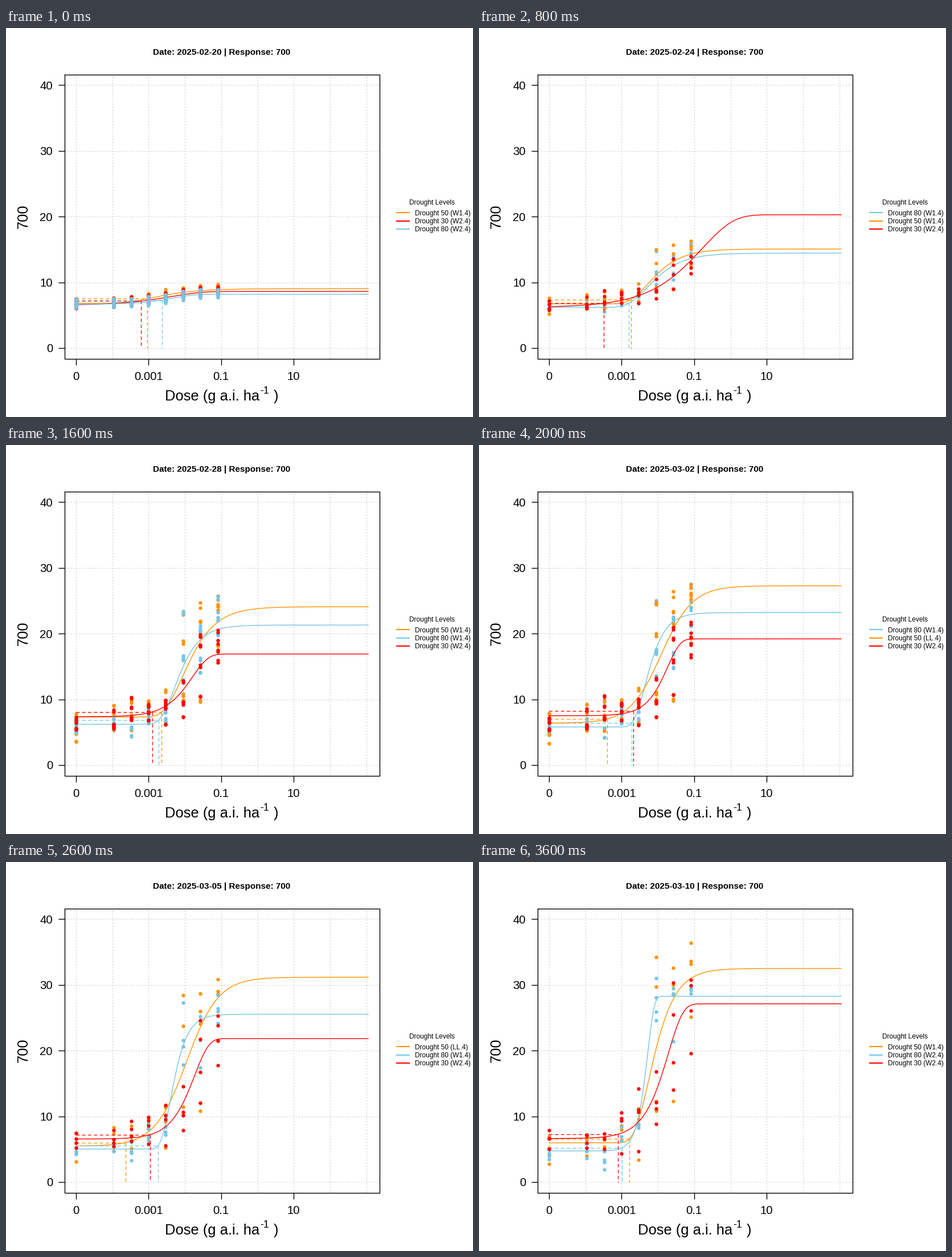
Animation, 820 px wide and 683 px high, one loop 3800 ms. Source, as a matplotlib script:

```python
import random

import numpy as np
import matplotlib.pyplot as plt
from matplotlib.animation import FuncAnimation

W, H, DPI = 820, 683, 64
PX = 72 / DPI  # points per pixel
DAYS = 19
X0, DECADE = 123, 63.7
Y0, UNIT = 562, 11.54
FONT = "Liberation Sans"

COLORS = {"50": "#FF9300", "30": "#FF0000", "80": "#75C5E8"}

# Dose-response links and their inverses (increasing curves)
LINKS = {
    "W1": (lambda p: -np.log(-np.log(p)), lambda z: np.exp(-np.exp(-z))),
    "W2": (lambda p: np.log(-np.log(1 - p)), lambda z: 1 - np.exp(-np.exp(z))),
    "LL": (lambda p: np.log(p / (1 - p)), lambda z: 1 / (1 + np.exp(-z))),
}

# First day of each set of models, in drawing order
MODELS = [
    (0, "50 W1, 30 W2, 80 W2"),
    (1, "50 LL, 30 W2, 80 W2"),
    (2, "50 W1, 80 W2, 30 W2"),
    (3, "80 LL, 50 W1, 30 W2"),
    (4, "80 W1, 50 W1, 30 W2"),
    (5, "80 LL, 50 W1, 30 W2"),
    (7, "80 W1, 50 W1, 30 W2"),
    (8, "50 W1, 80 W1, 30 W2"),
    (9, "80 W1, 50 LL, 30 W2"),
    (11, "50 LL, 80 W1, 30 W2"),
    (14, "50 LL, 80 W2, 30 W2"),
    (16, "50 W1, 80 W2, 30 W2"),
    (17, "50 W1, 30 W2, 80 W2"),
    (18, "50 W1, 80 W2, 30 W2"),
]

# Lower limit, upper limit, x at 10 % above the lower limit, x at half height
KNOTS = [0, 4, 8, 10, 13, 16, 18]
FITS = {
    "50": [(6.82, 9.05, 248, 273), (6.73, 15.08, 267, 309),
           (7.32, 24.09, 273, 322), (6.37, 27.28, 224.5, 320),
           (5.47, 31.17, 209.7, 317), (6.15, 30.39, 264.5, 305),
           (5.97, 32.5, 264, 308)],
    "30": [(6.5, 8.62, 236.6, 271), (6.2, 20.28, 219, 371),
           (7.35, 16.9, 256.5, 317), (7.5, 19.2, 271, 323),
           (6.55, 21.83, 252.5, 322), (6.33, 25.5, 238.5, 321),
           (6.62, 27.12, 244, 323)],
    "80": [(6.65, 8.19, 273.5, 281), (6.2, 14.45, 263, 308),
           (6.2, 21.3, 267.5, 305), (5.8, 23.2, 267.5, 299),
           (5.03, 25.54, 267, 295), (4.52, 27.47, 242, 293),
           (4.73, 28.28, 250.7, 292)],
}

# Four plants per dose: size in mid trial and at the end
MID = {
    "50": [(7.8, 6.5, 4.6, 3.3), (9.2, 8.0, 5.9, 5.3), (9.8, 7.6, 6.9, 5.2),
           (9.9, 9.2, 8.2, 7.0), (11.5, 9.9, 9.0, 6.4),
           (24.6, 19.8, 10.9, 9.9), (26, 23.3, 21.2, 9.9),
           (27.2, 26, 25.5, 19.3)],
    "30": [(7.1, 6.5, 5.5, 5.3), (8.4, 6.1, 5.9, 5.6), (10.5, 8.9, 7.2, 7.0),
           (9.4, 9.1, 8.1, 6.8), (10, 9.5, 8.8, 6.1), (13.1, 9.7, 9.5, 7.3),
           (20.8, 19.2, 15.8, 10.7), (21.6, 19.8, 18.4, 16.6)],
    "80": [(6.7, 5.9, 5.1, 4.8), (7.0, 6.3, 5.8, 5.4), (7.0, 5.6, 5.3, 4.2),
           (8.5, 7.8, 7.0, 6.4), (9.0, 8.1, 7.0, 6.5),
           (24.8, 17.3, 17.1, 13.4), (22.4, 21.8, 17, 14.8),
           (27.3, 24.4, 23.8, 21.2)],
}
END = {
    "50": [(7.0, 5.2, 4.2, 2.8), (7.0, 6.5, 4.8, 4.0), (6.8, 6.4, 5.4, 4.9),
           (9.3, 8.6, 8.0, 6.3), (11.2, 10.7, 9.5, 3.4),
           (34.2, 29.7, 12.3, 10.8), (32.6, 30, 28.5, 12.3),
           (36.4, 33.6, 33.2, 25.1)],
    "30": [(7.9, 6.7, 6.6, 5.0), (7.2, 7.1, 6.0, 5.2), (7.4, 6.7, 6.6, 5.0),
           (10.6, 9.7, 9.4, 4.3), (14.2, 11, 10.7, 4.7),
           (16.8, 12.1, 11.2, 8.8), (30.3, 25.5, 18.2, 14),
           (30.8, 29.9, 26.1, 19.6)],
    "80": [(4.9, 4.4, 4.0, 3.5), (5.8, 5.2, 4.7, 3.6), (4.7, 3.4, 3.0, 1.9),
           (9.3, 8.4, 6.9, 6.2), (10.8, 8.8, 8.6, 8.2),
           (31, 28.1, 25.9, 24.6), (29.5, 28.7, 28.5, 21.4),
           (30, 29.5, 29.2, 28.7)],
}
SPREAD = np.array([0.7, 0.25, -0.15, -0.45])
SINGLE_DAYS = {4, 13, 18}  # one reading per plant, otherwise two

DOSE_X = np.array([X0] + [371.5 - 30.4 * k for k in range(6, -1, -1)])
CURVE_X = np.linspace(X0, 636, 300)

rng = random.Random(4)
JITTER = {lv: np.array([[rng.uniform(0.003, 0.018) for _ in range(4)]
                        for _ in range(8)]) for lv in COLORS}


def to_y(v):
    return Y0 - UNIT * np.asarray(v)


def fit_at(level, day):
    return [np.interp(day, KNOTS, col) for col in zip(*FITS[level])]


def response(level, model, day, x):
    low, top, x_ed, x_half = fit_at(level, day)
    link, inverse = LINKS[model]
    z_ed = link(0.1 * low / (top - low))
    slope = (link(0.5) - z_ed) / (x_half - x_ed)
    return low + (top - low) * inverse(z_ed + slope * (x - x_ed))


def plants(level, day):
    model = "W1" if level == "50" else "W2"
    start = response(level, model, 0, DOSE_X)[:, None] + SPREAD
    mid, end = np.array(MID[level]), np.array(END[level])
    early = np.interp(day, [0, 4, 8, 10], [0, 0.38, 0.9, 1])
    late = np.interp(day, [10, 13, 16, 18], [0, 0.4, 0.87, 1])
    size = start + (mid - start) * early + (end - mid) * late
    x = np.repeat(DOSE_X, 4)
    if day in SINGLE_DAYS:
        return x, size.ravel()
    both = [size * (1 + JITTER[level]), size * (1 - JITTER[level])]
    return np.tile(x, 2), np.concatenate([b.ravel() for b in both])


def models_on(day):
    rows = [text for first, text in MODELS if first <= day][-1]
    return [row.split() for row in rows.split(", ")]


def date_text(day):
    d = 20 + day
    return f"2025-02-{d:02d}" if d <= 28 else f"2025-03-{d - 28:02d}"


fig = plt.figure(figsize=(W / DPI, H / DPI), dpi=DPI, facecolor="white")
ax = fig.add_axes([0, 0, 1, 1])
ax.set_xlim(0, W)
ax.set_ylim(H, 0)
ax.axis("off")


def line(xs, ys, color="black", width=1.4, **kw):
    return ax.plot(xs, ys, color=color, lw=width * PX, **kw)[0]


def label(x, y, text, size, ha="left", **kw):
    return ax.text(x, y, text, fontsize=size * PX, family=FONT, ha=ha,
                   va="baseline", **kw)


# Grid, box and axes
dots = dict(ls=(0, (1, 3)), dash_capstyle="round", zorder=1)
for i in range(9):
    x = X0 + i * DECADE
    line([x, x], [580.5, 82], "#D3D3D3", 1.3, **dots)
for v in range(0, 50, 10):
    y = to_y(v)
    line([102.5, 656], [y, y], "#D3D3D3", 1.3, **dots)
    line([91.5, 102.5], [y, y], solid_capstyle="butt", zorder=2)
    label(82, y + 7.4, str(v), 20.4, "right")
for i, text in zip((0, 2, 4, 6), ("0", "0.001", "0.1", "10")):
    x = X0 + i * DECADE
    line([x, x], [580.5, 591.5], solid_capstyle="butt", zorder=2)
    label(x, 617.8, text, 20.4, "center")
line([102.5, 656, 656, 102.5, 102.5], [82, 82, 580.5, 580.5, 82], zorder=2)

label(279, 653.8, "Dose (g a.i. ha", 25.5)
label(446.5, 641.5, "-1", 17.85)
label(469.8, 653.8, ")", 25.5)
label(37.5, 331, "700", 25.5, "center", rotation=90, rotation_mode="anchor")
title = label(379, 47.3, "", 15.3, "center", weight="bold")

# Legend
label(748.5, 310.3, "Drought Levels", 11.9, "center")
keys, names = [], []
for i in range(3):
    y = 324.3 + 14.3 * i
    keys.append(line([685.5, 708], [y, y], width=2.1))
    names.append(label(717.6, y + 4.3, "", 11.9))

# One set of artists per series, later series on top
series = []
for i in range(3):
    z = 3 + 3 * i
    dashes = dict(ls=(0, (4, 4)), dash_capstyle="round", zorder=z + 2)
    series.append(dict(
        dots=ax.plot([], [], "o", ms=6.4 * PX, mew=0, zorder=z)[0],
        curve=line([], [], width=1.4, zorder=z + 1),
        across=line([], [], width=1.3, **dashes),
        down=line([], [], width=1.3, **dashes),
    ))


def update(day):
    title.set_text(f"Date: {date_text(day)} | Response: 700")
    for i, (level, model) in enumerate(models_on(day)):
        art, color = series[i], COLORS[level]
        for a in art.values():
            a.set_color(color)
        keys[i].set_color(color)
        names[i].set_text(f"Drought {level} ({model}.4)")

        px, size = plants(level, day)
        art["dots"].set_data(px, to_y(size))
        art["curve"].set_data(CURVE_X, to_y(response(level, model, day, CURVE_X)))
        low, _, x_ed, _ = fit_at(level, day)
        y_ed = to_y(1.1 * low)
        art["across"].set_data([X0, x_ed], [y_ed, y_ed])
        art["down"].set_data([x_ed, x_ed], [y_ed, Y0])
    return []


anim = FuncAnimation(fig, update, frames=DAYS, init_func=lambda: update(0),
                     interval=200, repeat=True, repeat_delay=0, blit=False)
plt.show()
```
